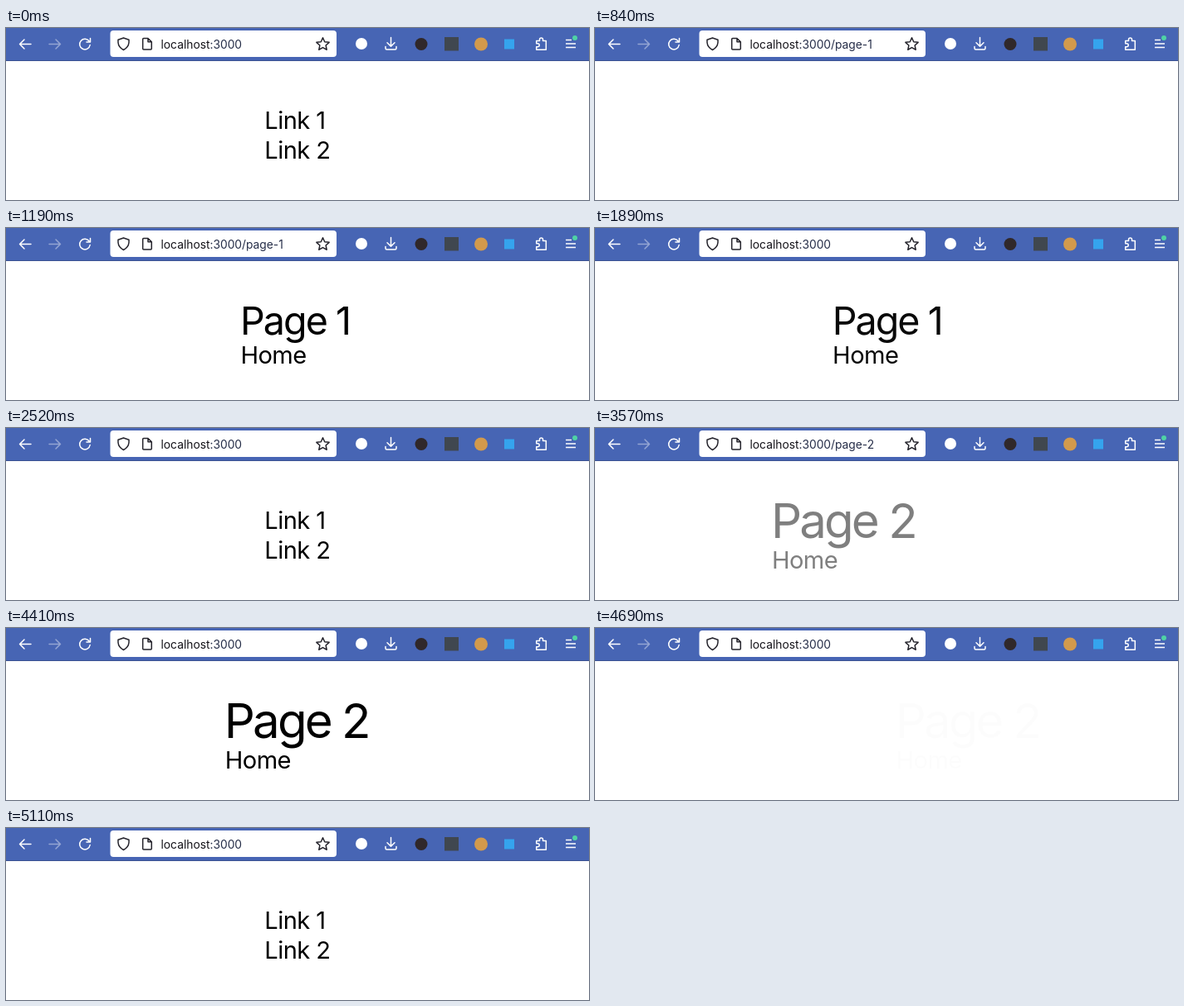
These frames come from a looping animation (702x208 px, 5.18 s). An HTML page:

```html
<!DOCTYPE html>
<html lang="en">
<head>
<meta charset="utf-8">
<title>Page transitions</title>
<style>
  html, body { margin: 0; width: 100%; height: 100%; overflow: hidden; background: #fff; }
  svg { display: block; }
  text { font-family: Inter, "Liberation Sans", sans-serif; font-optical-sizing: none; white-space: pre; }
  .page { font-size: 29.1px; letter-spacing: -.02em; }
  .h1 { font-size: 46.6px; letter-spacing: -.042em; }
  .h2 { font-size: 58.2px; letter-spacing: -.05em; }
  .url { font-size: 13.8px; }
  .icon { fill: none; stroke-width: 1.5; stroke-linecap: round; stroke-linejoin: round; }
</style>
</head>
<body>
<svg width="702" height="208" viewBox="0 0 702 208">
  <rect width="702" height="40" fill="#4765b4"/>
  <rect y="39" width="702" height="1" fill="#3a5191"/>
  <rect x="125.500" y="3" width="272.500" height="32" rx="4" fill="#fff"/>

  <g class="icon" stroke="#fff">
    <path id="arrow" d="M30 19.500H16.500M22 14L16.500 19.500L22 25"/>
    <use href="#arrow" transform="matrix(-1 0 0 1 82 0)" opacity=".42"/>
    <path d="M100.300 16.200A6.300 6.300 0 1 0 101.200 20.500M101.500 12.500V17H97"/>
    <path d="M463.500 11.500V22M459 17.800L463.500 22.300L468 17.800M457 22.500V24.500Q457 26 458.500 26H468.500Q470 26 470 24.500V22.500"/>
    <path d="M638.700 15.500H642.500V14A2 2 0 0 1 646.500 14V15.500H650.300V26.200H638.700V22.800H640.200A2 2 0 0 0 640.200 18.800H638.700Z"/>
    <path d="M674 14.500H681M674 19H686M674 23.500H686" stroke-linecap="butt"/>
  </g>
  <g class="icon" stroke="#25242c" stroke-width="1.400">
    <path d="M141.500 12L148 14.300V17.500Q147.500 23.500 141.500 26.500Q135.500 23.500 135 17.500V14.300Z"/>
    <path d="M164.700 13.500Q164.700 12.500 165.700 12.500H171L175.300 16.800V25Q175.300 26 174.300 26H165.700Q164.700 26 164.700 25ZM171 12.500V16.800H175.300"/>
    <path id="star"/>
  </g>

  <circle cx="428" cy="19" r="7" fill="#fff"/>
  <circle cx="500" cy="19.500" r="7.500" fill="#30282a"/>
  <rect x="528" y="11" width="17" height="16.500" fill="#40474f"/>
  <circle cx="572" cy="19.500" r="8" fill="#d39a4c"/>
  <rect x="600" y="13.500" width="12" height="12" fill="#35a4ee"/>
  <circle cx="685" cy="12" r="3" fill="#4fd3a5"/>

  <text class="url" x="186.500" y="24.500" fill="#15141a">localhost<tspan fill="#252d48">:3000<tspan id="path"></tspan></tspan></text>

  <g class="page">
    <text x="311.300" y="122">Link 1</text>
    <text x="311.300" y="158">Link 2</text>
  </g>
  <g class="page">
    <text class="h1" x="282" y="128.600">Page 1</text>
    <text x="282.400" y="164">Home</text>
  </g>
  <g class="page">
    <text class="h2" x="262.300" y="133">Page 2</text>
    <text x="263.200" y="170">Home</text>
  </g>
</svg>
<script>
const LOOP = 5180, STEP = 70;
const DURATION = 315, ENTER_DELAY = 335, SHIFT = 100;
const paths = ['', '/page-1', '/page-2'];
const visits = [
  { at: 495, from: 0, to: 1 },
  { at: 1847, from: 1, to: 0 },
  { at: 3078, from: 0, to: 2 },
  { at: 4393, from: 2, to: 0 }
];
const pages = document.querySelectorAll('.page');
const path = document.getElementById('path');

const starPoints = Array.from({ length: 10 }, (_, i) => {
  const r = i % 2 ? 3.8 : 8, a = (i / 5 - .5) * Math.PI;
  return (381.5 + r * Math.cos(a)).toFixed(2) + ' ' + (19.8 + r * Math.sin(a)).toFixed(2);
});
document.getElementById('star').setAttribute('d', 'M' + starPoints.join('L') + 'Z');

// Same curve as cubic-bezier(.42, 0, .58, 1).
function easeInOut(x) {
  if (x <= 0) return 0;
  if (x >= 1) return 1;
  let lo = 0, hi = 1, s;
  for (let i = 0; i < 20; i++) {
    s = (lo + hi) / 2;
    const bx = 3 * (1 - s) * s * (.42 * (1 - s) + .58 * s) + s ** 3;
    if (bx < x) lo = s; else hi = s;
  }
  return s * s * (3 - 2 * s);
}

function show(index, x, opacity) {
  pages.forEach((page, i) => {
    page.setAttribute('opacity', i === index ? opacity : 0);
    if (i === index) page.setAttribute('transform', `translate(${x} 0)`);
  });
}

function render(time) {
  const t = Math.floor(time % LOOP / STEP) * STEP;
  const visit = visits.findLast(v => v.at <= t);
  path.textContent = visit ? paths[visit.to] : '';
  if (!visit) return show(0, 0, 1);
  const elapsed = t - visit.at;
  if (elapsed < ENTER_DELAY) {
    const p = easeInOut(elapsed / DURATION);
    show(visit.from, SHIFT * p, 1 - p);
  } else {
    const p = easeInOut((elapsed - ENTER_DELAY) / DURATION);
    show(visit.to, SHIFT * (p - 1), p);
  }
}

const start = performance.now();
function tick() {
  render(performance.now() - start);
  requestAnimationFrame(tick);
}
tick();
</script>
</body>
</html>
```
